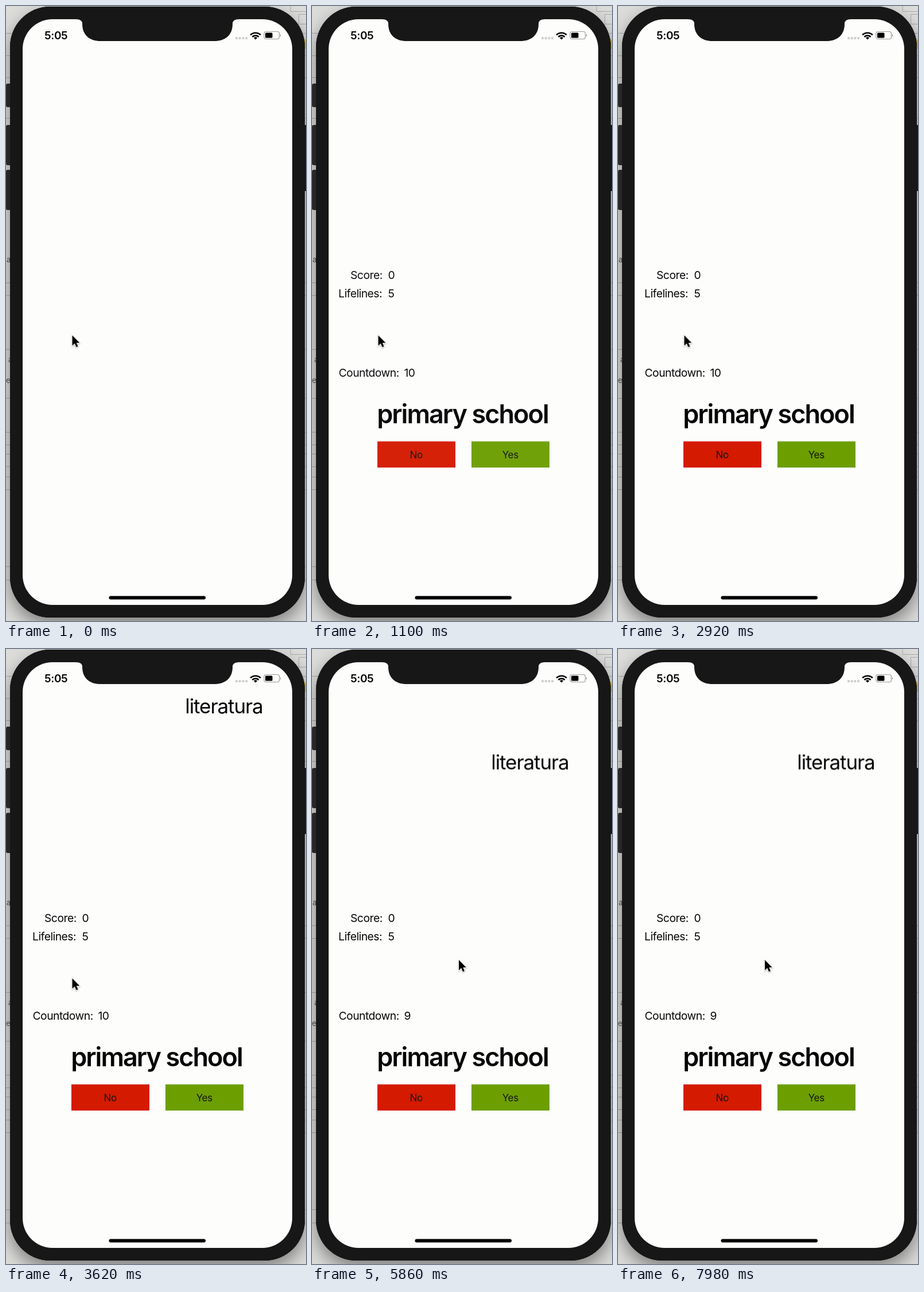
An HTML page for the animation above (8 s loop, 523 px wide and 1070 px high).

```html
<!DOCTYPE html>
<html lang="en">
<head>
<meta charset="utf-8">
<title>Word game</title>
<style>
html, body { margin: 0; width: 100%; height: 100%; overflow: hidden; background: #dcdcdb; }
svg { display: block; width: 523px; height: 1070px; }
text { font: 400 19.3px Inter, Roboto, sans-serif; font-optical-sizing: none; letter-spacing: -.5px; fill: #050505; }
.mid { text-anchor: middle; }
.button { font-size: 17px; letter-spacing: -.3px; fill: #151510; }
.prompt { font-size: 45px; font-weight: 600; letter-spacing: -1.95px; }
.word { font-size: 35px; letter-spacing: -1.1px; }
.clock { font-size: 19px; font-weight: 600; letter-spacing: -.4px; }
.behind { font-size: 13px; fill: #444; }
.body { filter: drop-shadow(0 13px 15px rgba(0, 0, 0, .42)); }
.pointer { filter: drop-shadow(0 1.5px 1px rgba(0, 0, 0, .3)); }
</style>
</head>
<body>
<svg viewBox="0 0 523 1070">
  <!-- window behind the phone -->
  <rect width="523" height="1070" fill="#dcdcdb"/>
  <g id="rules" stroke="#a9a9a9"></g>
  <path d="M496 9.500H523M496 9V0M523 14.500H510.500V31.500H523" fill="none" stroke="#aaa"/>
  <rect x="517" y="58" width="6" height="17" fill="#efc32c"/>

  <!-- phone -->
  <g class="body">
    <rect x="7" y="1" width="514" height="1063" rx="70" fill="#171717"/>
  </g>
  <text class="behind" x="1" y="446">a</text>
  <text class="behind" x="4" y="620" font-weight="700">a</text>
  <text class="behind" x="0" y="656">e</text>
  <g fill="#272727">
    <rect x="0" y="135" width="12" height="41" rx="3"/>
    <rect x="0" y="207" width="12" height="70" rx="3"/>
    <rect x="0" y="285" width="12" height="70" rx="3"/>
    <rect x="515" y="207" width="10" height="115" rx="2" fill="#151515"/>
  </g>
  <rect x="7" y="1" width="514" height="1063" rx="70" fill="#171717"/>
  <rect x="29" y="23" width="470" height="1019" rx="52" fill="#fdfdfc"/>
  <path d="M122 22V23Q133 23 133 31C133 51 146 61 165 61H363C382 61 395 51 395 31Q395 23 406 23V22Z" fill="#171717"/>
  <rect x="179.500" y="1026.500" width="168.500" height="6" rx="3" fill="#000"/>

  <!-- status bar -->
  <text class="clock" x="67" y="58">5:05</text>
  <path d="M402 56H420" stroke="#cfcfcd" stroke-width="4.400" stroke-linecap="round" stroke-dasharray="0 5.700"/>
  <g fill="none" stroke="#000" stroke-width="2.700">
    <path d="M426.200 50.300A12.700 12.700 0 0 1 443.800 50.300"/>
    <path d="M429.400 53.700A8 8 0 0 1 440.600 53.700"/>
  </g>
  <path d="M435 58.500L431.900 55.400A4.500 4.500 0 0 1 438.100 55.400Z"/>
  <rect x="450" y="44.500" width="26.500" height="13" rx="3.500" fill="none" stroke="#9b9b9b" stroke-width="1.200"/>
  <rect x="452" y="46.500" width="12.500" height="9" rx="1.500"/>
  <path d="M478 49Q480.200 51 478 53.500Z" fill="#777"/>

  <!-- game -->
  <g id="game">
    <text x="67" y="474.500">Score:</text><text x="132.500" y="474.500">0</text>
    <text x="46" y="507">Lifelines:</text><text x="132.500" y="507">5</text>
    <text x="46.500" y="644.500">Countdown:</text>
    <text id="ten" x="160.500" y="644.500">10</text>
    <text id="nine" x="160.500" y="644.500">9</text>
    <text class="prompt mid" x="262.500" y="726">primary school</text>
    <rect x="114" y="757.500" width="136" height="45.500" fill="#d41a00"/>
    <rect x="278" y="757.500" width="136" height="45.500" fill="#6c9e00"/>
    <text class="button mid" x="181.800" y="786.500">No</text>
    <text class="button mid" x="345.800" y="786.500">Yes</text>
  </g>
  <text id="word" class="word mid" x="380" y="112">literatura</text>

  <g id="pointer">
    <path class="pointer" d="M0 0V18L4.200 14L7 20.500L10 19.200L7.300 12.900H12.800Z"
      stroke="#fff" stroke-width="2" paint-order="stroke"/>
  </g>
</svg>
<script>
const LOOP = 8000, START = 3000, TICK = 5500;
const $ = id => document.getElementById(id);

$("rules").innerHTML = [47, 86, 124, 195, 481, 503, 597, 682, 741, 763, 779, 801, 819, 841, 975, 998]
  .map(y => `<path d="M0 ${y}.5H523"/>`).join("");

// steps: [time, value, easing until the next step]
function play(id, prop, steps, ease) {
  const last = steps[steps.length - 1];
  const frames = [...steps, [LOOP, last[1]]].map(([time, value, easing = ease]) =>
    ({ offset: time / LOOP, [prop]: value, easing }));
  $(id).animate(frames, { duration: LOOP, iterations: Infinity });
}

const at = (x, y) => `translate(${x}px, ${y}px)`;
const HOLD = "steps(1, end)", SMOOTH = "ease-in-out";

play("game", "opacity", [[0, 0], [1250, 1]], SMOOTH);
play("ten", "opacity", [[0, 1], [TICK, 0]], HOLD);
play("nine", "opacity", [[0, 0], [TICK, 1]], HOLD);
play("word", "opacity", [[0, 0], [START, 1]], HOLD);
play("word", "transform", [[0, at(0, 0)], [TICK, at(0, 97.5)]], HOLD);
play("pointer", "transform", [
  [0, at(115.5, 573)], [3900, at(115.5, 573)], [4500, at(135.5, 540)],
  [4760, at(135.5, 540)], [5500, at(256, 541)]
], SMOOTH);
</script>
</body>
</html>
```
